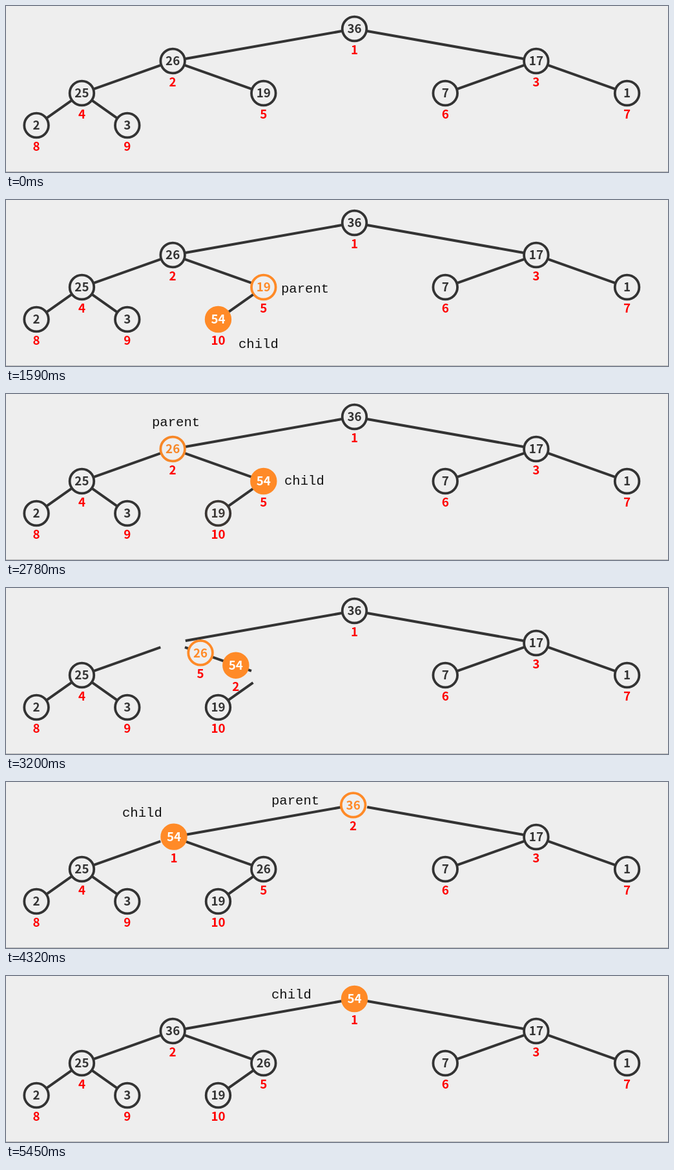
An HTML page that plays this animation: 1025 by 258 pixels, repeating every 5.79 s.

```html
<!DOCTYPE html>
<html lang="en">
<head>
<meta charset="utf-8">
<title>Heap insertion</title>
<style>
  html, body { margin: 0; width: 100%; height: 100%; overflow: hidden; background: #eee; }
  svg { display: block; width: 1025px; height: 258px; }
  line { stroke: #333; stroke-width: 4; }
  circle { stroke-width: 3.8; }
  text { font: 700 18.8px "Noto Sans CJK SC", "Noto Sans CJK JP", "Noto Sans CJK", "Open Sans", sans-serif; text-anchor: middle; }
  .index { fill: #f00; }
  .note { font: 20.6px "Liberation Mono", monospace; text-anchor: start; fill: #111; }
</style>
</head>
<body>
<svg id="stage" viewBox="0 0 1025 258"></svg>
<script>
const LOOP = 5790, STEP = 70, FADE = 660, R = 20;
const BG = [238, 238, 238], DARK = [51, 51, 51], ORANGE = [255, 138, 39];
const stage = document.getElementById("stage");

function add(parent, tag, attrs, text) {
  const el = document.createElementNS("http://www.w3.org/2000/svg", tag);
  set(el, attrs);
  if (text !== undefined) el.textContent = text;
  parent.appendChild(el);
  return el;
}
function set(el, attrs) {
  for (const k in attrs) el.setAttribute(k, attrs[k]);
}

const lerp = (a, b, p) => a + (b - a) * p;
const mix = (a, b, p) => "rgb(" + a.map((v, i) => Math.round(lerp(v, b[i], p))) + ")";
function ease(t, start, span = FADE) {
  const p = Math.min(1, Math.max(0, (t - start) / span));
  return p < 0.5 ? 4 * p ** 3 : 1 - 4 * (1 - p) ** 3;
}

// Place of a heap slot (1-based) in the tree
function slot(i) {
  const depth = Math.floor(Math.log2(i));
  const k = i - 2 ** depth;
  return { x: -23.25 + 1125.5 * (2 * k + 1) / 2 ** (depth + 1), y: 35.5 + 50 * depth };
}

// Edge to a slot from its parent, cut at both circles
function edgeEnds(i) {
  const a = slot(i >> 1), b = slot(i);
  const d = Math.hypot(b.x - a.x, b.y - a.y);
  const ux = (b.x - a.x) / d * R, uy = (b.y - a.y) / d * R;
  return { x1: a.x + ux, y1: a.y + uy, x2: b.x - ux, y2: b.y - uy };
}

// moves: [start, slot, duration]; lit: [on, off, fade-out duration]
const nodes = [
  { value: 36, at: 1, moves: [[4235, 2, 720]], lit: [3580, 5100, 360] },
  { value: 26, at: 2, moves: [[2920, 5]], lit: [2260, 3580] },
  { value: 17, at: 3 },
  { value: 25, at: 4 },
  { value: 19, at: 5, moves: [[1600, 10]], lit: [940, 2260] },
  { value: 7, at: 6 },
  { value: 1, at: 7 },
  { value: 2, at: 8 },
  { value: 3, at: 9 },
  { value: 54, at: 10, moves: [[1600, 5], [2920, 2], [4235, 1, 720]], born: 270 }
];

const notes = [
  ["parent", 426, 144, 1170, 1670],
  ["child", 360, 230, 1170, 1670],
  ["parent", 226, 50, 2500, 3000],
  ["child", 431, 141, 2500, 3000],
  ["parent", 411, 35, 3830, 4390],
  ["child", 180, 54, 3830, 4390],
  ["child", 411, 35, 5020, LOOP]
];

add(stage, "rect", { width: 1025, height: 258, fill: mix(BG, BG, 0) });
add(stage, "rect", { y: 257, width: 1025, height: 1, fill: "#b8b8b8" });
for (let i = 2; i < 10; i++) add(stage, "line", edgeEnds(i));

let newEdge;
for (const n of nodes) {
  if (n.born) newEdge = add(stage, "line", {});
  n.group = add(stage, "g", {});
  n.circle = add(n.group, "circle", { r: 18.8 });
  n.text = add(n.group, "text", { y: 6.8 }, n.value);
  n.index = add(n.group, "text", { y: 39.6, class: "index" }, n.at);
}
const noteEls = notes.map(([word, x, y]) => add(stage, "text", { x, y, class: "note" }, word));

function drawNode(n, t) {
  let { x, y } = slot(n.at), index = n.at;
  for (const [start, to, span] of n.moves || []) {
    if (t < start) break;
    const p = ease(t, start, span), end = slot(to);
    x = lerp(x, end.x, p);
    y = lerp(y, end.y, p);
    index = to;
  }
  set(n.group, { transform: `translate(${x} ${y})` });
  n.index.textContent = index;

  if (n.born) {
    set(n.group, { opacity: ease(t, n.born, 640) });
    set(n.circle, { fill: mix(ORANGE, ORANGE, 0), stroke: mix(ORANGE, ORANGE, 0) });
    set(n.text, { fill: "#fff" });
    return;
  }
  const glow = n.lit ? ease(t, n.lit[0]) - ease(t, n.lit[1], n.lit[2]) : 0;
  const color = mix(DARK, ORANGE, glow);
  set(n.circle, { fill: mix(BG, BG, 0), stroke: color });
  set(n.text, { fill: color });
}

// The new edge sweeps from the root's left edge to its own place
function drawNewEdge(t) {
  const p = ease(t, 270, 640), root = slot(1), a = edgeEnds(2), b = edgeEnds(10);
  set(newEdge, {
    x1: lerp(root.x, b.x1, p), y1: lerp(root.y, b.y1, p),
    x2: lerp(a.x2, b.x2, p), y2: lerp(a.y2, b.y2, p),
    visibility: t < 330 ? "hidden" : "visible"
  });
}

function stepped(t) {
  if (t < 330) return 0;
  if (t >= 5450) return 5460;
  return Math.min(5380, 330 + Math.floor((t - 330) / STEP) * STEP);
}

function draw(ms) {
  const t = stepped(ms % LOOP);
  nodes.forEach(n => drawNode(n, t));
  drawNewEdge(t);
  noteEls.forEach((el, i) => {
    const [, , , from, to] = notes[i];
    set(el, { visibility: t >= from && t < to ? "visible" : "hidden" });
  });
}

const begin = performance.now();
function tick() {
  draw(performance.now() - begin);
  requestAnimationFrame(tick);
}
tick();
</script>
</body>
</html>
```
